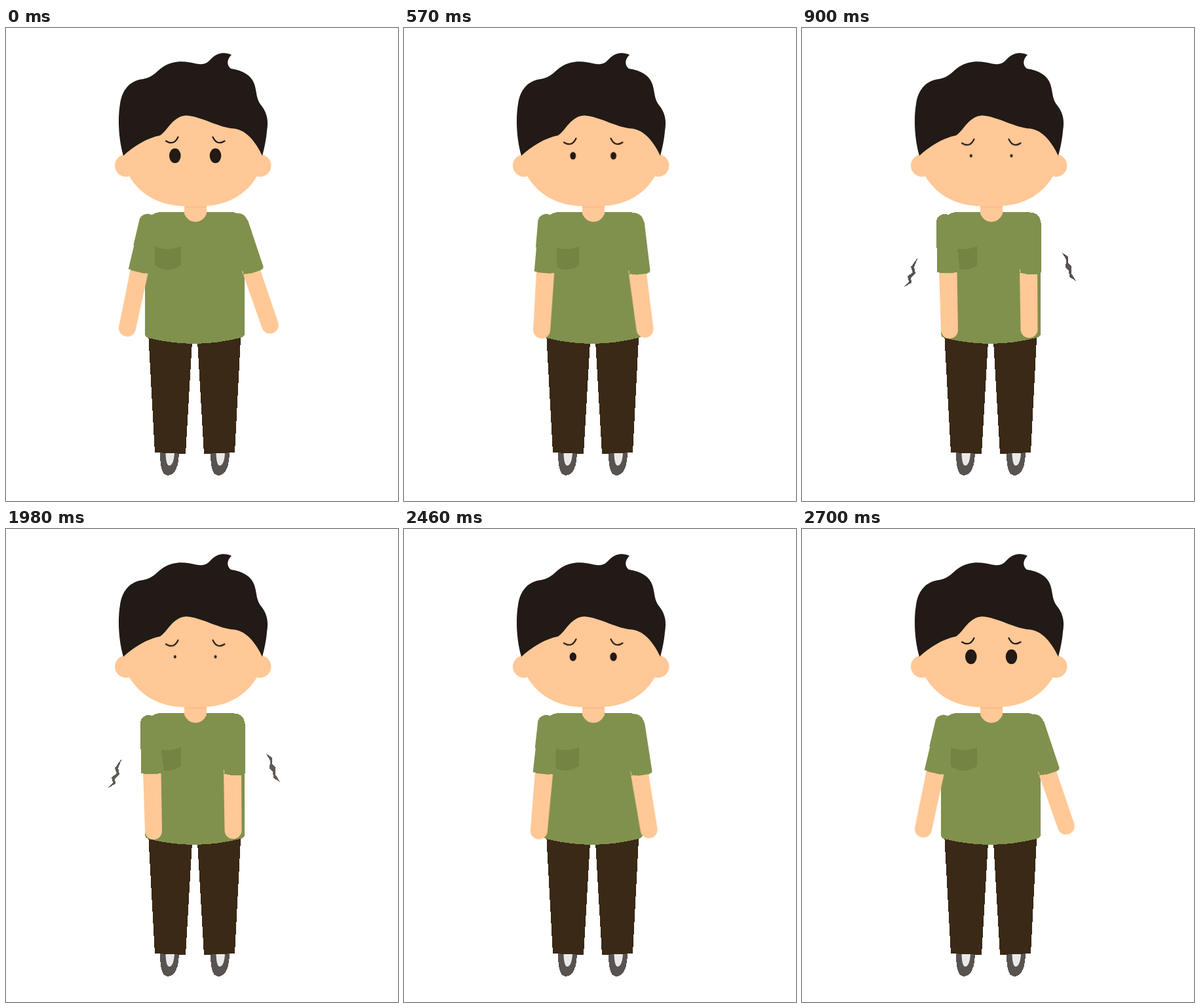
An HTML page without scripts for the animation above (3780 ms loop, 598 by 722 pixels).

```html
<!DOCTYPE html>
<html lang="en">
<head>
<meta charset="utf-8">
<title>Shivering boy</title>
<style>
  html, body { margin: 0; width: 100%; height: 100%; overflow: hidden; background: #fff; }
  svg { display: block; width: 100%; height: 100%; }

  .skin { fill: #ffc896; }
  .shirt { fill: #80914d; }
  .hair { fill: #211a16; }
  .trousers { fill: #3a2916; }
  .grey { fill: #595350; }
  .shirt, .trousers, .grey { shape-rendering: crispEdges; }

  /* Relaxed pose -> tense pose -> relaxed pose */
  .move { animation: pose 3780ms cubic-bezier(.37, 0, .63, 1) infinite; }
  @keyframes pose {
    0%, 7.94% { transform: var(--calm); }
    20.24%, 59.13% { transform: var(--tense); }
    71.43%, 100% { transform: var(--calm); }
  }
  .arm { --tense: rotate(0deg); }
  .left { --calm: rotate(13.3deg); transform-origin: 218px 288px; }
  .right { --calm: rotate(-18.4deg); transform-origin: 354.5px 283px; }
  .brows {
    --calm: translateY(0); --tense: translateY(3.3px);
    fill: none; stroke: #211a16; stroke-width: 2.2; stroke-linecap: round;
  }
  .eye { --calm: scale(1); --tense: scale(.22); transform-box: fill-box; transform-origin: center; }

  .shiver { animation: shiver 3780ms linear infinite; }
  @keyframes shiver {
    0%, 18.25% { opacity: 0; }
    23.81%, 52.1% { opacity: 1; }
    59%, 100% { opacity: 0; }
  }
</style>
</head>
<body>
<svg viewBox="0 0 598 722">
  <defs>
    <g id="shoe">
      <path class="grey" d="M235 646C235 668 237 683 247 683C258 683 264 669 264 646Z"/>
      <path fill="#e9e9ea" d="M243.500 646C243.500 658 245 668 249 668C254 668 257 658 257 646Z"/>
    </g>
  </defs>

  <use href="#shoe"/>
  <use href="#shoe" x="77"/>
  <path class="trousers" d="M217 465L227 648L274 650L284 478ZM292 478L302 650L349 648L358.500 465Z"/>

  <!-- Torso -->
  <path class="shirt" d="M236 281H346Q355 281 364 296V466Q364 471 359 472.500Q288 491 217 473Q212 471.500 212 467V298Q220 282 236 281Z"/>
  <path fill="#748443" d="M227 333Q247 342 267 333V362Q247 376 227 362Z"/>

  <!-- Arms -->
  <g class="move arm left">
    <path class="skin" d="M209 368L212 461A13 13 0 0 0 238 461L236.500 368Z"/>
    <path class="shirt" d="M204.500 297Q206 285 217 284L231 286L241 372Q222 376 206.500 373Z"/>
  </g>
  <g class="move arm right">
    <path class="skin" d="M332 368L333.500 460A13 13 0 0 0 359.500 460L359 368Z"/>
    <path class="shirt" d="M342 286Q348 281 354 282.500Q363 285 365 299L364.500 375Q348 378 332.500 373.500L336 300Z"/>
  </g>

  <!-- Head -->
  <path class="skin" d="M272 270H306V284Q300 296 289 296Q278 296 272 284Z"/>
  <path fill="#f9bf90" d="M272 272H306V274.500H272Z"/>
  <g class="skin">
    <circle cx="183" cy="210" r="17"/>
    <circle cx="387.500" cy="210" r="17"/>
    <path d="M179 193L187 224C202 252 232 272 275 272H300C340 271 369 252 384 224L391 193L388 150L330 120H235Z"/>
  </g>
  <path class="hair" d="M179 195C172 170 170 140 174 116C177 95 188 82 205 78.500C225 76 228 67 240 59C258 48 275 51 290 54.500C304 57 307 53 314 46C322 38 334 36 344 41C337 48 336 56 343 62C362 65 374 72 379 86C383 98 381 108 390 119C400 132 400 145 398 157C397 170 394 184 391 195C382 176 368 156 348 153.500C327 153 298 135 275 133.500C254 135 248 155 235 164C215 168 195 180 179 195Z"/>

  <path class="move brows" d="M244 172.500Q256 180 262.500 166.500M315.500 166.500Q322 180 333.500 172.500"/>
  <g class="hair">
    <ellipse class="move eye" cx="257.800" cy="195" rx="8.800" ry="11.300"/>
    <ellipse class="move eye" cx="319.500" cy="195" rx="8.800" ry="11.300"/>
  </g>

  <path class="shiver grey" d="M177 350L166 365L169 373L161 379L163 387L156 395L167 389L166 381L173 374L171 365ZM397 343L406 349V359L411 363L410.500 374L418 386L408 380L407 370L402 366L403 354Z"/>
</svg>
</body>
</html>
```
